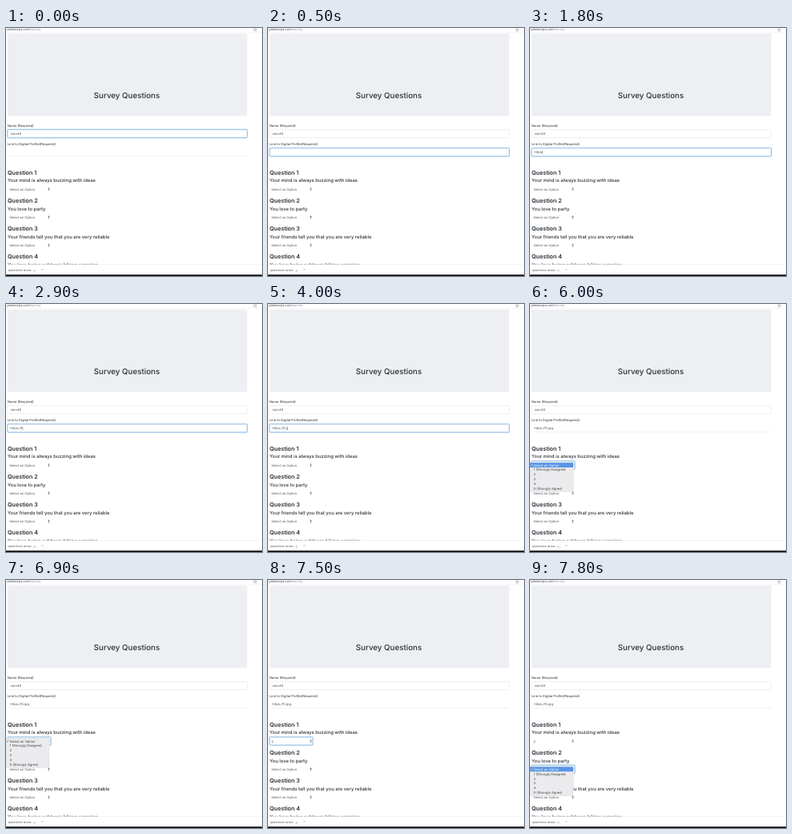
These frames come from a looping animation (320x311 px, 8000 ms). An HTML page:

```html
<!DOCTYPE html>
<html lang="en">
<head>
<meta charset="utf-8">
<title>Survey</title>
<style>
  html, body { margin: 0; width: 100%; height: 100%; overflow: hidden; background: #fff; }
  svg { display: block; width: 100vw; height: 100vh; }
  text { font-family: Inter, "Open Sans", sans-serif; text-rendering: geometricPrecision; white-space: pre; }
</style>
</head>
<body>
<svg id="stage" viewBox="0 0 320 311"></svg>
<script>
const LOOP = 8000, SMALL = 4.1, INK = '#2b2f34', GREY = '#4e5358';
const LINK = 'https://tt.jpg';
const KEYS = [1000, 1400, 1500, 1600, 1800, 2200, 2400, 2600, 2900, 3100, 3400, 4000, 4300, 4900];
const OPTIONS = ['Select an Option', '1 (Strongly Disagree)', '2', '3', '4', '5 (Strongly Agree)'];
const QUESTIONS = [
  'Your mind is always buzzing with ideas',
  'You love to party',
  'Your friends tell you that you are very reliable',
  'You love being outdoors hiking camping'
];
const FIRST = 203.5, STEP = 35.2, ROW = 5.9;

const stage = document.getElementById('stage');
const pen = document.createElement('canvas').getContext('2d');
const ramp = (t, from, to) => Math.min(1, Math.max(0, (t - from) / (to - from)));

function textWidth(s) {
  pen.font = '41px Inter, "Open Sans", sans-serif';
  return pen.measureText(s).width * SMALL / 41;
}

const text = (x, y, s, size = SMALL, fill = GREY, weight = 400) =>
  `<text x="${x}" y="${y}" font-size="${size}" fill="${fill}" font-weight="${weight}">${s}</text>`;
const rect = (x, y, w, h, fill, more = '') =>
  `<rect x="${x}" y="${y}" width="${w}" height="${h}" fill="${fill}" ${more}/>`;
const path = (d, more) => `<path d="${d}" ${more}/>`;

function ring(x, y, w, h, alpha) {
  if (!alpha) return '';
  return `<g opacity="${alpha}">` +
    rect(x, y, w, h, 'none', 'rx="1" stroke="#d3e6f7" stroke-width="1.8"') +
    rect(x, y, w, h, '#fff', 'rx="1" stroke="#82b3de" stroke-width=".8"') + '</g>';
}

function select(i, value, focused) {
  const y = FIRST + STEP * i;
  return ring(2, y - 6.5, 54, 10, focused ? 1 : 0) + text(4.2, y, value) +
    path(`M52.4 ${y - 1.9}l1.1-1.5 1.1 1.5zM52.4 ${y - 1.1}l1.1 1.5 1.1-1.5z`, 'fill="#4a4e54"');
}

function popup(i, active, alpha) {
  const base = FIRST + STEP * i;
  let out = `<g opacity="${alpha}">` +
    rect(-1, base - 5, 55, 36.8, '#ebebed', 'rx="1" stroke="#d4d4d8" stroke-width=".5"');
  OPTIONS.forEach((label, n) => {
    const y = base + ROW * n, on = n === active;
    const ink = on ? '#fff' : '#3c3e42';
    if (on) out += rect(0, y - 4.4, 54, ROW, '#5795e6');
    if (n === 0) out += path(`M.8 ${y - 1.4}l.9 1.2 1.4-2.7`, `fill="none" stroke="${ink}" stroke-width=".5"`);
    out += text(4.6, y, label, SMALL, ink);
  });
  return out + '</g>';
}

function linkField(t) {
  const typed = KEYS.filter(k => k <= t).length;
  const value = LINK.slice(0, typed);
  const lastKey = typed ? KEYS[typed - 1] : 800;
  let out = text(5.2, 157.2, value);
  if (t >= 800 && t < 5900 && t - lastKey < 500)
    out += rect(5.4 + textWidth(value), 153.8, .5, 4.4, '#555');
  return out;
}

function form(t) {
  const moved = ramp(t, 100, 300);
  const linkFocus = moved * (1 - ramp(t, 5900, 6000));
  return text(2, 123.6, 'Name (Required)', SMALL, INK) +
    rect(2, 127.4, 299.5, 10.2, '#fff', 'rx="1" stroke="#e6e8eb" stroke-width=".7"') +
    ring(2, 127.4, 299.5, 10.2, 1 - moved) +
    text(5.4, 134, 'zarn48') +
    text(2, 147, 'Link to Digital Profile(Required)', SMALL, INK) +
    rect(2, 160, 299.5, .7, '#eceef0') +
    ring(2, 150.6, 299.5, 10.2, linkFocus) +
    linkField(t);
}

function survey(t) {
  const opened = t >= 5900, chosen = t >= 7000, second = t >= 7700;
  let out = '';
  QUESTIONS.forEach((q, i) => {
    const y = FIRST + STEP * i;
    out += text(2, y - 19.9, `Question ${i + 1}`, 7.2, INK, 600) +
      text(2, y - 10.2, q, 5.9, INK, 500);
    if (i < 3) {
      const focused = i === 0 ? opened && !second : i === 1 && second;
      out += select(i, i === 0 && chosen ? '2' : OPTIONS[0], focused);
    }
  });
  if (opened && t < 7400) {
    const active = t < 6200 ? 0 : t < 6300 ? 1 : t < 6900 ? 2 : t < 7000 ? -1 : 2;
    out += popup(0, active, 1 - ramp(t, 7000, 7400));
  }
  if (second) out += popup(1, 0, 1);
  return out;
}

const browserTop = text(-1, 3.4, 't.plimworps.com<tspan fill="#8b8f94">/survey</tspan>', 3.9, '#3b3e42') +
  rect(0, 5.2, 320, .5, '#e9eaec') +
  path('M311.5 .2l.6 1.3 1.4.1-1.1 1 .4 1.4-1.3-.8-1.3.8.4-1.4-1.1-1 1.4-.1z',
    'fill="none" stroke="#777" stroke-width=".4"');
const hero = rect(2, 7, 299.5, 103.3, '#eeeff3', 'rx="1.2"') +
  text(109.8, 88.3, 'Survey Questions', 9.75, INK, 500);
const browserEnd = rect(0, 296.8, 320, 15, '#fff') +
  rect(0, 296.5, 320, .5, '#e8e9eb') +
  text(2.4, 304.6, 'questions-answ...j...', 3.9, '#5b5f64') +
  path('M44 303.6l1.3-1.3 1.3 1.3', 'fill="none" stroke="#777" stroke-width=".5"') +
  rect(0, 309.3, 320, 2, '#0b0b0d');

let shown = '';
function frame() {
  const t = performance.now() % LOOP;
  const scene = browserTop + hero + form(t) + survey(t) + browserEnd;
  if (scene !== shown) stage.innerHTML = shown = scene;
  requestAnimationFrame(frame);
}
frame();
</script>
</body>
</html>
```
